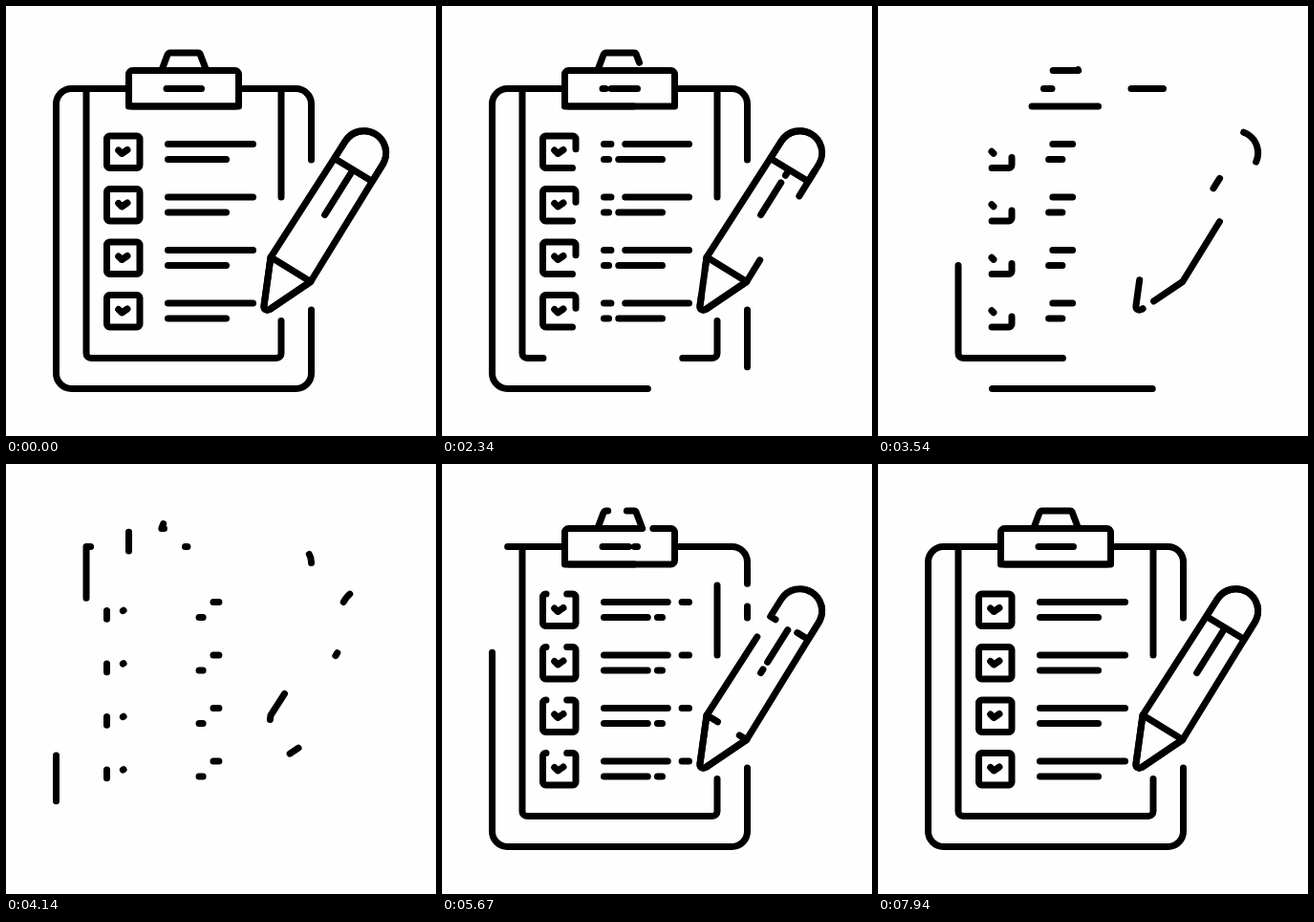
Write an HTML page that moves like this. It is 450 px wide and 450 px high and loops after 8000 ms.

```html
<!DOCTYPE html>
<html lang="en">
<head>
<meta charset="utf-8">
<title>Checklist</title>
<style>
  html, body { margin: 0; height: 100%; overflow: hidden; background: #fefefe; }
  svg { display: block; width: 100vw; height: 100vh; }
</style>
</head>
<body>
<svg viewBox="0 0 450 450">
  <g id="art" fill="none" stroke="#000" stroke-width="7" stroke-linecap="round" stroke-linejoin="round"></g>
</svg>
<script>
const LOOP = 8000, START = 2000, HALF = 2000, FPS = 30;
const art = document.getElementById('art');

const board = [
  'M319.5 318V384.5A16 16 0 0 1 303.5 400.5H68.5A16 16 0 0 1 52.5 384.5V102.5A16 16 0 0 1 68.5 86.5H128.5',
  'M243.5 86.5H303.5A16 16 0 0 1 319.5 102.5V161'
];
const paper = 'M288 329.5V363.5A5 5 0 0 1 283 368.5H89A5 5 0 0 1 84 363.5V86.5H128.5V105H243.5V86.5H288V200';
const clip = [
  'M243.5 71.5V101A4 4 0 0 1 239.5 105H132.5A4 4 0 0 1 128.5 101V71.5A4 4 0 0 1 132.5 67.5H239.5A4 4 0 0 1 243.5 71.5Z',
  'M203 50L209.7 67.5H162.8L168.8 51.6Q169.8 49.1 172 49.1H201Q202.4 49.1 203 50Z',
  'M168 86.5H204.5'
];
const pencil = [
  'M394.5 165.4L318.8 288.5L276 317.5C272.5 319.3 269.6 317.5 270 313.5L277 263L355.3 141.2A23.04 23.04 0 0 1 394.5 165.4Z',
  'M383.2 183.5L394.5 165.4A23.04 23.04 0 0 0 355.3 141.2L343.7 159.5Z',
  'M277 262.8L270 313.5C269.6 317.5 272.5 319.3 276 317.5L318.8 288.5Z',
  'M361.8 173.6L333.6 218.6'
];
const row = y => [
  `M140 ${y + 3}v27.5a3 3 0 0 1 -3 3h-28.5a3 3 0 0 1 -3 -3v-27.5a3 3 0 0 1 3 -3h28.5a3 3 0 0 1 3 3Z`,
  `M117.7 ${y + 15}l3.5 3.5l5.8 -4`,
  `M169.5 ${y + 8.5}h89`,
  `M169.5 ${y + 24.5}h61`
];

const rows = [0, 1, 2, 3].flatMap(i => row(136 + i * 55.5));
art.innerHTML = [...board, paper, ...clip, ...pencil, ...rows]
  .map(d => `<path pathLength="1" d="${d}"/>`).join('');

// Every path shows one stretch of itself, which shrinks and regrows while travelling two laps.
function draw(now) {
  const step = Math.floor(now % LOOP * FPS / 1000 + 0.1);
  const u = (step * 1000 / FPS - START) / HALF;
  const len = Math.abs(1 - u);
  const from = (0.5 + u - len / 2) % 1;
  const whole = len >= 1;
  art.style.strokeDasharray = whole ? 'none' : `${len} ${1 - len}`;
  art.style.strokeDashoffset = whole ? 0 : -from;
}

const begin = performance.now();
function tick() {
  draw(performance.now() - begin);
  requestAnimationFrame(tick);
}
tick();
</script>
</body>
</html>
```
